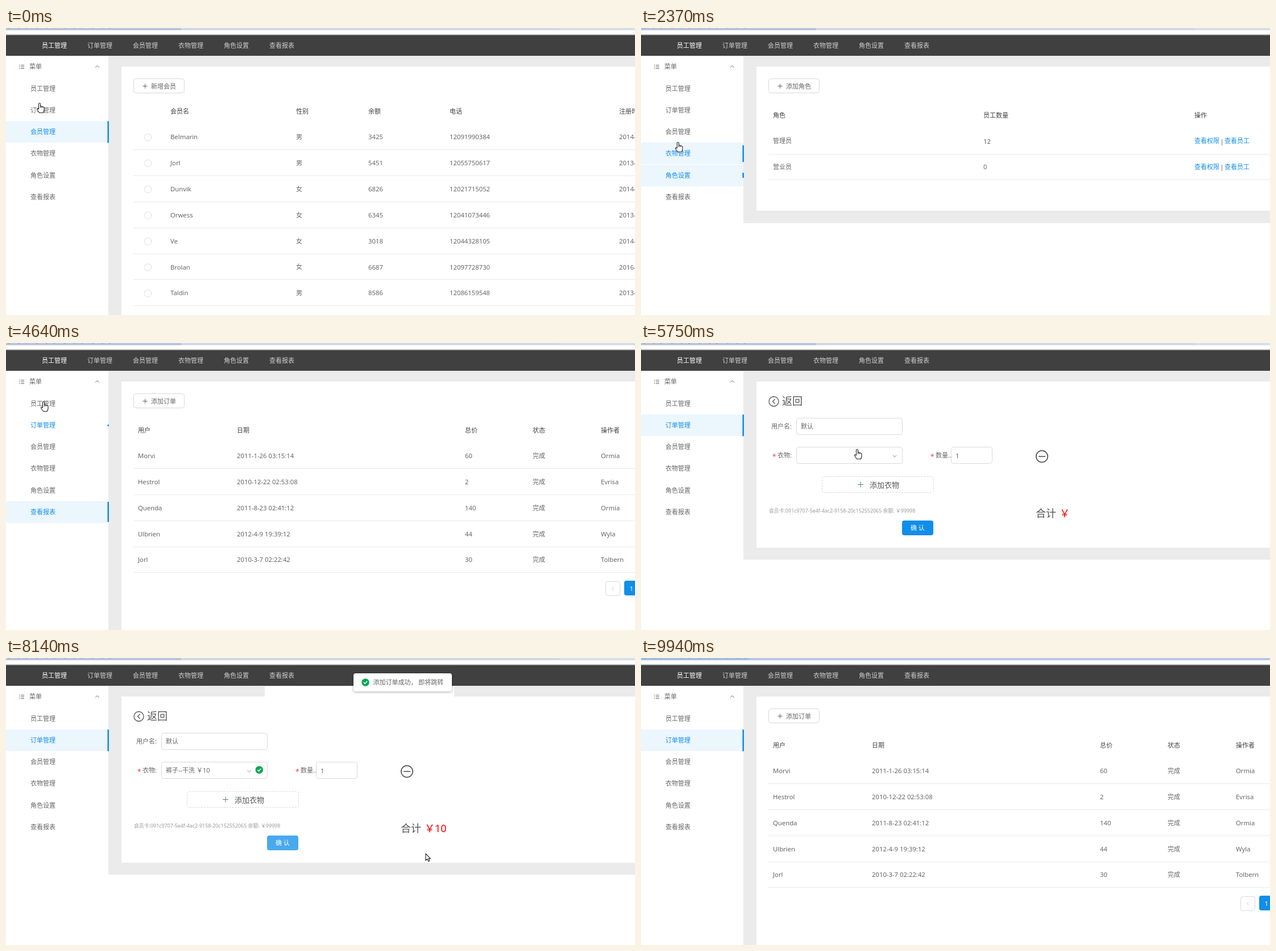
Recreate the animation shown at these times as an HTML page with a canvas. Size 1106 px wide and 506 px high, loop 9980 ms.

```html
<!DOCTYPE html>
<html lang="zh-CN">
<head>
<meta charset="utf-8">
<style>
html, body { margin: 0; width: 100%; height: 100%; overflow: hidden; background: #fff; }
canvas { display: block; width: 1106px; height: 506px; }
</style>
</head>
<body>
<canvas id="stage" width="1106" height="506"></canvas>
<script>
const ctx = document.getElementById('stage').getContext('2d');
const LOOP = 9980;
const BLUE = '#108ee9', PALE = '#ecf6fd', GRAY = '#666', DARK = '#404040', EDGE = '#d9d9d9';
const FONT = '"Noto Sans", "Noto Sans CJK SC", "Noto Sans CJK", sans-serif';
const MENU = ['员工管理', '订单管理', '会员管理', '衣物管理', '角色设置', '查看报表'];
const ITEM_TOP = 88, ITEM_H = 38.15, SIDE_W = 180;

// The screen refreshes in bursts: [start, end, number of refreshes]
const BURSTS = [[440, 1370, 7], [1510, 1910, 4], [2220, 3220, 8], [3350, 4360, 8], [4490, 5340, 7],
  [5750, 6750, 8], [6870, 7830, 8], [7980, 8830, 7], [9390, 9660, 3]];

// Menu choices: [time, item]
const PICKS = [[-1000, 2], [880, 3], [2328, 4], [3470, 5], [4621, 1]];
const FORM_AT = 5190, LIST_AT = 8500;

// Pointer tip: [time, x, y, arrow shape]
const POINTER = [[0, 59, 132], [440, 59, 132], [600, 61, 160], [905, 65, 224], [1510, 65, 224],
  [1910, 66, 256], [2220, 66, 256], [2360, 65, 200], [2650, 65, 270], [2935, 66, 296], [3350, 66, 296],
  [3636, 66, 220], [4064, 66, 146], [4490, 66, 146], [4630, 64, 103], [4700, 130, 103, 1],
  [4918, 262, 104], [5340, 268, 106], [5750, 380, 187], [6036, 380, 190], [6464, 390, 260],
  [6870, 390, 262], [7005, 426, 271, 1], [7441, 485, 322], [7980, 487, 322], [8120, 735, 344, 1],
  [8260, 980, 400, 1], [8400, 1140, 480, 1]];

const MEMBERS = [
  ['Belmarin', '男', '3425', '12091990384', '2014-'],
  ['Jorl', '男', '5451', '12055750617', '2013-'],
  ['Dunvik', '女', '6826', '12021715052', '2014-'],
  ['Orwess', '女', '6345', '12041073446', '2013-'],
  ['Ve', '女', '3018', '12044328105', '2014-'],
  ['Brolan', '女', '6687', '12097728730', '2016-'],
  ['Taldin', '男', '8586', '12086159548', '2013-']];
const ORDERS = [
  ['Morvi', '2011-1-26 03:15:14', '60', '完成', 'Ormia'],
  ['Hestrol', '2010-12-22 02:53:08', '2', '完成', 'Evrisa'],
  ['Quenda', '2011-8-23 02:41:12', '140', '完成', 'Ormia'],
  ['Ulbrien', '2012-4-9 19:39:12', '44', '完成', 'Wyla'],
  ['Jorl', '2010-3-7 02:22:42', '30', '完成', 'Tolbern']];
const GOODS = [['上衣', '干洗', 15], ['裤子', '干洗', 10], ['大衣', '干洗', 30], ['裤子', '水洗', 6],
  ['衬衫', '水洗', 8], ['毛衣', '干洗', 20], ['裙子', '水洗', 12]];

const clamp = v => Math.max(0, Math.min(1, v));

function refreshTime(t) {
  if (t >= 9940) return 9940;
  const burst = BURSTS.findLast(b => t >= b[0]);
  if (!burst) return 0;
  const [a, b, n] = burst, gap = (b - a) / (n - 1);
  return a + Math.min(n - 1, Math.floor((t - a) / gap + 0.001)) * gap;
}

function pointerAt(t) {
  const i = POINTER.findLastIndex(p => t >= p[0]);
  if (i < 0 || i === POINTER.length - 1) return null;
  const a = POINTER[i], b = POINTER[i + 1], k = (t - a[0]) / (b[0] - a[0]);
  return { x: a[1] + (b[1] - a[1]) * k, y: a[2] + (b[2] - a[2]) * k, arrow: a[3] };
}

// y is the vertical middle of the glyphs
function text(s, x, y, color = GRAY, size = /[^\x00-\x7f]/.test(s) ? 11 : 11.3, weight = 400) {
  ctx.font = `${weight} ${size}px ${FONT}`;
  ctx.fillStyle = color;
  ctx.fillText(s, x, Math.round(y + size * 0.36));
}

function rect(x, y, w, h, color) {
  ctx.fillStyle = color;
  ctx.fillRect(x, y, w, h);
}

function box(x, y, w, h, fill, stroke, dash = []) {
  const inset = stroke ? 0.5 : 0;
  ctx.beginPath();
  ctx.roundRect(x + inset, y + inset, w - 2 * inset, h - 2 * inset, 4);
  ctx.fillStyle = fill;
  ctx.fill();
  if (stroke) {
    ctx.setLineDash(dash);
    ctx.strokeStyle = stroke;
    ctx.lineWidth = 1;
    ctx.stroke();
    ctx.setLineDash([]);
  }
}

function line(points, color, width = 1) {
  ctx.beginPath();
  points.forEach(([x, y]) => ctx.lineTo(x, y));
  ctx.strokeStyle = color;
  ctx.lineWidth = width;
  ctx.stroke();
}

function ring(x, y, r, color, width = 1, dash = []) {
  ctx.beginPath();
  ctx.arc(x, y, r, 0, 7);
  ctx.setLineDash(dash);
  ctx.strokeStyle = color;
  ctx.lineWidth = width;
  ctx.stroke();
  ctx.setLineDash([]);
}

function plus(x, y, r, color) {
  line([[x - r, y], [x + r, y]], color);
  line([[x, y - r], [x, y + r]], color);
}

function check(x, y) {
  ctx.beginPath();
  ctx.arc(x, y, 6.7, 0, 7);
  ctx.fillStyle = '#00a854';
  ctx.fill();
  line([[x - 3, y], [x - 0.8, y + 2.3], [x + 3.2, y - 2.2]], '#fff', 1.5);
}

function chevron(x, y, r, color = '#888', dir = 1) {
  line([[x - r, y - dir * r / 2], [x, y + dir * r / 2], [x + r, y - dir * r / 2]], color);
}

function drawTop(late) {
  rect(0, 0, 1106, 4, late ? '#b3c7e4' : '#d0d8e7');
  rect(0, 0, late ? 190 : 308, 4, late ? '#a8bedf' : '#bac5d9');
  if (!late) rect(973, 0, 133, 4, '#d6deea');
  for (let x = 4; x < 185; x += 13 + x % 7) rect(x, 0, 3, 1, '#98a3b8');
  rect(0, 11, 1106, 1, '#c4c4c4');
  rect(0, 12, 1106, 1, '#858585');
  rect(0, 13, 1106, 36, DARK);
  MENU.forEach((s, i) => text(s, 63 + i * 80, 31, i ? '#cfcfcf' : '#fff', 11, i ? 400 : 500));
}

function drawSide(t) {
  const n = PICKS.findLastIndex(p => t >= p[0]);
  const now = PICKS[n][1], old = n > 0 ? PICKS[n - 1][1] : -1;
  const p = clamp((t - PICKS[n][0]) / 150);
  const over = pointerAt(t - 143);
  rect(0, 49, SIDE_W, 457, '#fff');
  for (const y of [65.5, 68.5, 71.5]) {
    rect(23, y - 0.5, 1.5, 1, GRAY);
    rect(26, y - 0.5, 6, 1, GRAY);
  }
  text('菜单', 41, 68.5);
  chevron(160.5, 68, 3.3, GRAY, -1);
  MENU.forEach((s, i) => {
    const top = ITEM_TOP + i * ITEM_H, mid = top + ITEM_H / 2;
    const leaving = i === old && p < 1;
    const hover = over && over.x < SIDE_W && over.y >= top && over.y < top + ITEM_H;
    if (i === now || leaving) {
      ctx.globalAlpha = leaving ? 1 : clamp((p - 0.08) * 7);
      rect(0, Math.round(top), SIDE_W, 38, PALE);
      ctx.globalAlpha = 1;
      const h = ITEM_H * (leaving ? 1 - p : p);
      rect(178.4, mid - h / 2, 2.6, h, BLUE);
    }
    text(s, 43, mid, i === now || leaving || hover ? BLUE : GRAY);
  });
}

function card(bottom, end) {
  rect(SIDE_W, 49, 1106 - SIDE_W, end - 49, '#ebebeb');
  rect(203, 68, 903, bottom - 68, '#fff');
}

function addButton(label) {
  box(224, 89, 90, 26, '#fff', EDGE);
  plus(244.5, 102.5, 4, GRAY);
  text(label, 255, 103);
}

function table(heads, cols, headY, rows, firstY, links) {
  heads.forEach((s, i) => text(s, cols[i], headY, DARK));
  rows.forEach((row, r) => {
    const y = firstY + r * 45.85;
    row.forEach((s, i) => text(s, cols[i], y));
    if (links) {
      const x = cols[cols.length - 1], w = links[0].length * 11;
      text(links[0], x, y, BLUE);
      text('|', x + w + 1.4, y);
      text(links[1], x + w + 9, y, BLUE);
    }
    rect(224, Math.round(y + 22), 882, 1, '#e9e9e9');
  });
}

function membersPage() {
  card(506, 506);
  addButton('新增会员');
  table(['会员名', '性别', '余额', '电话', '注册时间'], [289, 510, 637, 780, 1078], 147, MEMBERS, 192.2);
  MEMBERS.forEach((m, i) => ring(249.5, 192.8 + i * 45.85, 6.2, '#ccc', 1, [2, 1]));
}

function goodsPage() {
  card(416, 438);
  addButton('添加衣物');
  const rows = GOODS.slice(0, 4).map(([name, way, price]) => [name, way, '￥' + price]);
  table(['衣物', '类型', '价格', '操作'], [232, 510, 780, 1018], 154, rows, 199.5, ['编辑', '删除']);
}

function rolesPage() {
  card(322, 344);
  addButton('添加角色');
  table(['角色', '员工数量', '操作'], [232, 602, 973], 154, [['管理员', '12'], ['营业员', '0']], 199.5,
    ['查看权限', '查看员工']);
}

function ordersPage() {
  card(506, 506);
  addButton('添加订单');
  table(['用户', '日期', '总价', '状态', '操作者'], [232, 406, 807, 926, 1046], 154, ORDERS, 199);
  box(1054, 420, 26, 26, '#fff', EDGE);
  line([[1068.5, 430], [1065.5, 433], [1068.5, 436]], '#ccc');
  box(1087, 419, 26, 26, BLUE);
  text('1', 1096.5, 433, '#fff', 11.3, 500);
}

function dropdown(t) {
  ctx.save();
  ctx.shadowColor = 'rgba(0,0,0,.2)';
  ctx.shadowBlur = 6;
  ctx.shadowOffsetY = 1;
  box(273, 217, 187, 202, '#fff');
  ctx.restore();
  const p = pointerAt(t);
  GOODS.forEach(([name, way, price], i) => {
    const y = 217 + i * 28.8;
    if (p && p.y >= y && p.y < y + 28.8) rect(273, y, 187, 28.8, PALE);
    text(`${name}--${way} ￥${price}`, 281, y + 14.5);
  });
}

function formPage(t) {
  const chosen = t >= 7000, focused = t >= 5880 && t < 7960;
  card(361, 382);
  ring(233.5, 103, 8.5, '#555', 1.3);
  line([[235.5, 99], [231.5, 103], [235.5, 107]], '#555', 1.3);
  text('返回', 248, 103, '#555', 18);

  text('用户名:', 229, 147);
  box(273, 132, 187, 30, '#fff', EDGE);
  text('默认', 281, 147);

  text('*', 231, 200.5, '#f04134', 12);
  text('衣物:', 240, 198.5);
  if (focused) {
    ctx.beginPath();
    ctx.roundRect(272.5, 182.5, 188, 31, 5);
    ctx.strokeStyle = 'rgba(16,142,233,.25)';
    ctx.lineWidth = 3;
    ctx.stroke();
  }
  box(273, 183, 187, 30, '#fff', focused ? '#49a9ee' : EDGE);
  chevron(chosen ? 427.5 : 446, 199.5, 3.2);
  if (chosen) {
    text('裤子--干洗 ￥10', 281, 198.5);
    check(445.3, 197.3);
  }

  text('*', 509, 200.5, '#f04134', 12);
  text('数量..', 518, 198.5);
  box(545, 183, 73, 30, '#fff', EDGE);
  text('1', 553, 199);
  ring(705, 200, 10.2, '#444', 1.5);
  line([[699, 200], [711, 200]], '#444', 1.5);

  box(318, 235, 197, 29, '#fff', EDGE, [3, 2]);
  plus(386, 249.5, 5, '#557f78');
  text('添加衣物', 402, 250, '#555', 13);

  text('会员卡:091c9707-5e4f-4ac2-9158-20c152552065 余额: ￥99998', 225, 295.5, '#999', 8.9);
  text('合计', 694, 300.5, '#555', 18);
  text('￥' + (chosen ? 10 : ''), 736, 300.5, '#f00', 18);
  box(459, 313, 55, 26, t >= 7440 && t < 8200 ? '#49a9ee' : BLUE);
  text('确 认', 474, 326.5, '#fff', 11, 500);
  if (t >= 5880 && !chosen) dropdown(t);
}

function drawPage(t) {
  if (t >= LIST_AT) return ordersPage();
  if (t >= FORM_AT) return formPage(t);
  const item = PICKS.findLast(p => t >= p[0])[1];
  [null, ordersPage, membersPage, goodsPage, rolesPage, () => card(322, 344)][item]();
}

function drawToast(t) {
  const out = clamp((t - 9300) / 360);
  if (t < 8050 || out >= 1) return;
  ctx.save();
  ctx.globalAlpha = 1 - out;
  rect(455, 50, 333, 18, '#fff');
  ctx.translate(0, -10 * out);
  ctx.shadowColor = 'rgba(0,0,0,.35)';
  ctx.shadowBlur = 4;
  ctx.shadowOffsetY = 1;
  box(611, 27, 173, 32, '#fff');
  ctx.shadowColor = 'transparent';
  check(632, 43);
  text('添加订单成功， 即将跳转', 645.5, 43.5);
  ctx.restore();
}

function drawPointer(t) {
  const p = pointerAt(t);
  if (!p) return;
  ctx.save();
  ctx.translate(Math.round(p.x), Math.round(p.y));
  const shape = new Path2D(p.arrow
    ? 'M0 0V12L2.8 9.4L4.8 13.6L6.8 12.7L4.9 8.6H8.4Z'
    : 'M-1.5 1.5Q0 -1 1.5 1.5V6Q3 5 4 6.7Q5.5 5.8 6.2 7.4Q8 7 8 9V13L6.5 17.5H-.5L-4.5 11.5Q-4.5 9 -1.5 11Z');
  ctx.lineJoin = 'round';
  ctx.fillStyle = '#fff';
  ctx.fill(shape);
  ctx.strokeStyle = '#222';
  ctx.lineWidth = 1.1;
  ctx.stroke(shape);
  if (!p.arrow) {
    line([[1.5, 6], [1.5, 9]], '#222');
    line([[4, 6.8], [4, 9]], '#222');
  }
  ctx.restore();
}

function draw() {
  const t = refreshTime(performance.now() % LOOP);
  rect(0, 0, 1106, 506, '#fff');
  drawPage(t);
  drawSide(t);
  drawTop(t >= 9940);
  drawToast(t);
  drawPointer(t);
  requestAnimationFrame(draw);
}
draw();
</script>
</body>
</html>
```
